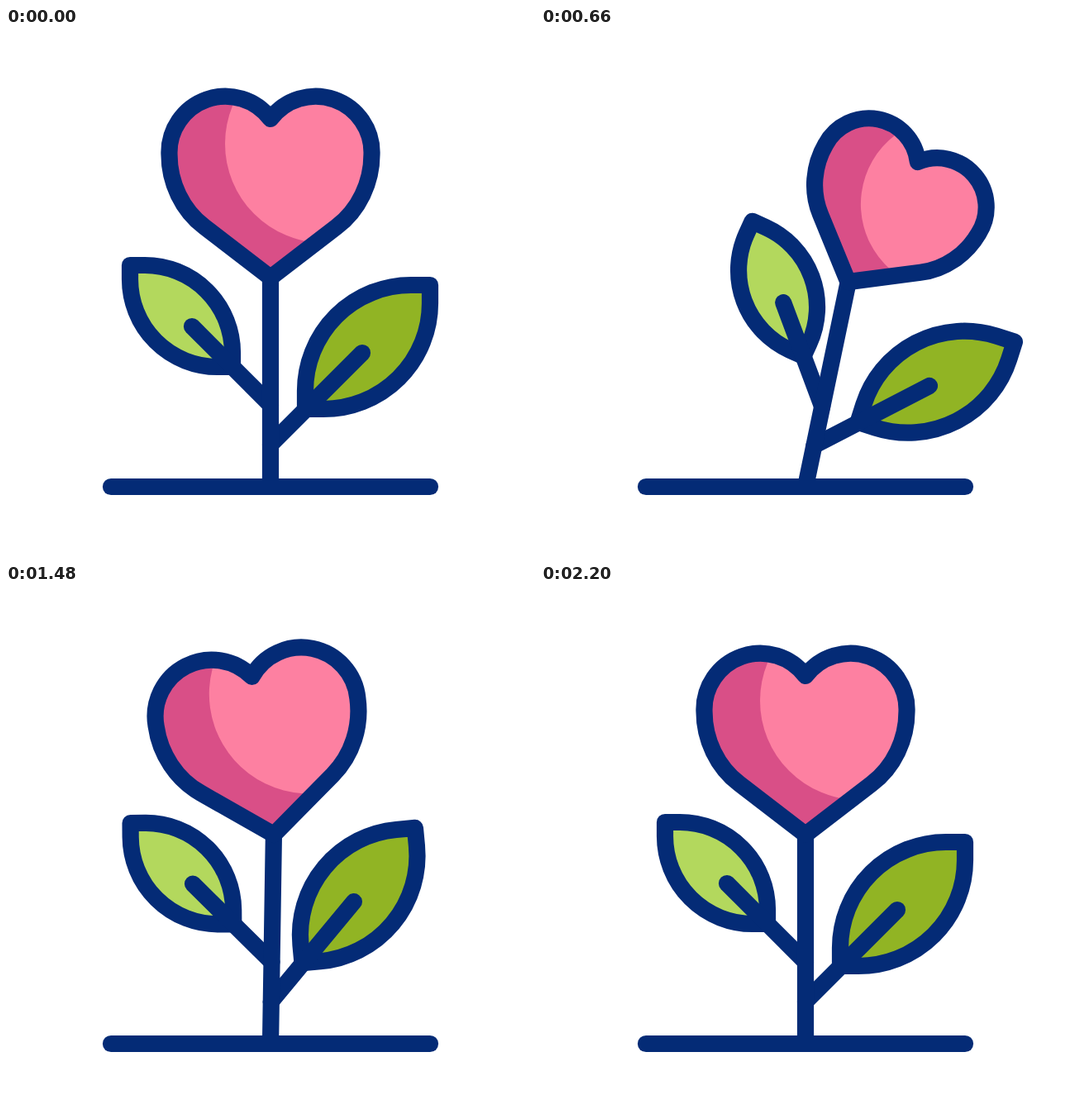
An HTML page that plays this animation: 640 by 640 pixels, repeating every 2.4 s.

```html
<!DOCTYPE html>
<html>
<head>
<meta charset="utf-8">
<style>
html, body { margin: 0; width: 100%; height: 100%; overflow: hidden; background: #fff; }
svg { display: block; width: 100vw; height: 100vh; }
.line { stroke: #042b76; stroke-width: 20.2; stroke-linecap: round; stroke-linejoin: round; fill: none; }
#shape { vector-effect: non-scaling-stroke; }
</style>
</head>
<body>
<svg viewBox="0 0 640 640">
  <defs>
    <path id="shape" d="M320 302L240 240.5C213 220 197.5 187 197.5 153A68 68 0 0 1 320 110A68 68 0 0 1 442.5 153C442.5 187 427 220 400 240.5Z"/>
    <clipPath id="inside"><use href="#shape"/></clipPath>
  </defs>
  <g id="stem">
    <g id="left" class="line">
      <path fill="#b3d85d" d="M150 287h18A106 106 0 0 1 274 393v17h-18A106 106 0 0 1 150 304z"/>
      <path d="M225 361L320 456"/>
    </g>
    <g id="right" class="line">
      <path fill="#91b424" d="M513 311h-23A128 128 0 0 0 362 439v22h22A129 128 0 0 0 513 333z"/>
      <path d="M431 393L320 504"/>
    </g>
    <path class="line" d="M320 302V555"/>
    <g id="heart">
      <use href="#shape" fill="#d94f87"/>
      <circle cx="385" cy="140" r="120" fill="#fd80a1" clip-path="url(#inside)"/>
      <use href="#shape" class="line"/>
    </g>
  </g>
  <path class="line" d="M127 555H513"/>
</svg>
<script>
const LOOP = 2400, BEGIN = 200, END = 2200, BEAT = 500;

const ease = p => p * p * (3 - 2 * p);

// Eased value at t for keys of [ms, value]
function track(keys, t) {
  const i = keys.findIndex(k => k[0] > t);
  if (i < 1) return keys.at(i)[1];
  const [t0, a] = keys[i - 1], [t1, b] = keys[i];
  return a + (b - a) * ease((t - t0) / (t1 - t0));
}

// Sway from rest through one peak per beat and back, trailing by lag
const sway = (lag, ...peaks) => [
  [BEGIN, 0],
  ...peaks.map((angle, i) => [BEGIN + (i + 1) * BEAT + lag, angle]),
  [END, 0]
];

const LAG = 120;
const parts = [
  { id: 'stem', y: 555, angle: sway(0, 12, -8, 7) },
  { id: 'left', y: 456, angle: sway(LAG, 15.2, -4, 7.4) },
  { id: 'right', y: 505, angle: sway(LAG, 7, -9.3, 3.3) },
  {
    id: 'heart', y: 301, angle: sway(LAG, 22, -14, 7.3),
    size: [[BEGIN, 1], [700, .872], [960, .857], [1450, 1.008], [1790, .86], [END, 1]]
  }
];
for (const part of parts) part.node = document.getElementById(part.id);

const start = performance.now();
function draw() {
  const t = (performance.now() - start) % LOOP;
  for (const { node, y, angle, size } of parts) {
    const scale = size ? track(size, t) : 1;
    node.setAttribute('transform',
      `translate(320 ${y}) rotate(${track(angle, t)}) scale(${scale}) translate(-320 ${-y})`);
  }
  requestAnimationFrame(draw);
}
draw();
</script>
</body>
</html>
```
